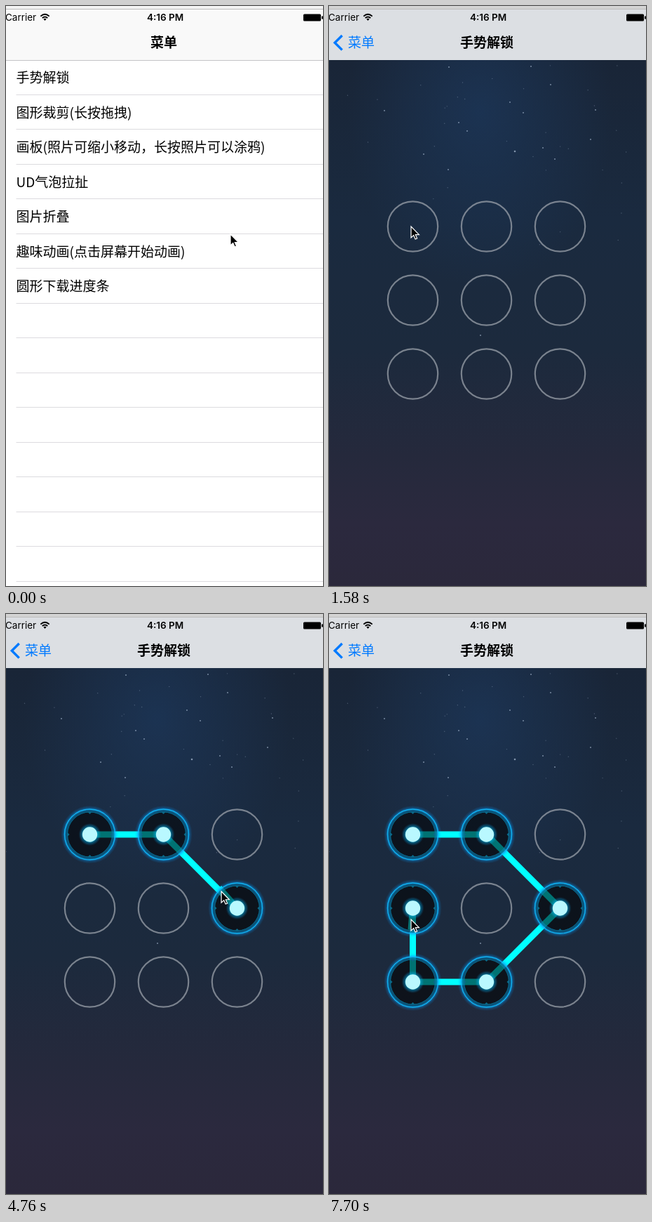
These frames come from a looping animation (452x826 px, 8 s). An HTML page:

```html
<!DOCTYPE html>
<html lang="zh">
<head>
<meta charset="utf-8">
<style>
  html, body { margin: 0; width: 100%; height: 100%; overflow: hidden; background: #fff; }
  svg { display: block; width: 100vw; height: 100vh; }
  text { font: 19px "Noto Sans CJK SC", "Noto Sans CJK", sans-serif; }
  .title { font-weight: 600; text-anchor: middle; }
  .status { font: 13.5px Inter, sans-serif; }
  .clock { font-weight: 600; text-anchor: middle; }
  .blue { fill: #007aff; }
</style>
</head>
<body>
<svg viewBox="0 0 452 826">
  <defs>
    <linearGradient id="sky" x2="0" y2="1">
      <stop offset="0" stop-color="#192537"/>
      <stop offset=".3" stop-color="#1a2a3f"/>
      <stop offset=".55" stop-color="#1c2a3d"/>
      <stop offset=".75" stop-color="#25293c"/>
      <stop offset=".88" stop-color="#2b293e"/>
      <stop offset="1" stop-color="#2b283b"/>
    </linearGradient>
    <radialGradient id="haze">
      <stop offset="0" stop-color="#1c3658" stop-opacity=".8"/>
      <stop offset="1" stop-color="#1c3658" stop-opacity="0"/>
    </radialGradient>
    <linearGradient id="shade">
      <stop offset="0" stop-opacity="0"/>
      <stop offset="1" stop-opacity=".14"/>
    </linearGradient>
    <linearGradient id="tint">
      <stop offset="0" stop-color="#c9cdd7" stop-opacity="0"/>
      <stop offset=".11" stop-color="#c9cdd7"/>
    </linearGradient>
    <radialGradient id="glow">
      <stop offset=".5" stop-color="#00d5ff" stop-opacity=".75"/>
      <stop offset="1" stop-color="#00a5ff" stop-opacity="0"/>
    </radialGradient>
  </defs>

  <rect width="452" height="826" fill="#fff"/>
  <g id="menu">
    <rect id="pressed" x="-8" y="77" width="600" height="49" fill="#d9d9d9"/>
  </g>
  <rect id="dim" y="77" width="452" height="749"/>

  <g id="page">
    <rect x="-20" y="77" width="12" height="749" fill="url(#shade)"/>
    <rect x="-8" y="77" width="468" height="749" fill="url(#sky)"/>
    <ellipse cx="215" cy="150" rx="190" ry="250" fill="url(#haze)" clip-path="inset(0)"/>
    <g id="stars" fill="#b9cbe0"></g>
    <polyline id="trail" fill="none" stroke="#00ffff" stroke-width="9" stroke-linejoin="round"/>
    <g id="nodes"></g>
  </g>

  <rect width="452" height="77" fill="#f9f9f9"/>
  <rect id="bar" width="640" height="77" fill="url(#tint)"/>
  <rect id="barEnd" width="452" height="77" fill="#dcdfe3"/>
  <rect id="hairline" y="77" width="452" height="1" fill="#c4c4c6"/>
  <rect id="strip" width="452" height="4.5"/>
  <rect y="4" width="452" height="1" fill="#bdbdbd"/>

  <text class="status" x="-1" y="21">Carrier</text>
  <text class="status clock" x="227" y="21">4:16 PM</text>
  <g fill="none" stroke="#000" stroke-width="1.9">
    <path d="M49.3 14.6Q55.5 9 61.7 14.6M51.7 17.1Q55.5 13.7 59.3 17.1"/>
    <path d="M53.4 18.6Q55.5 17 57.6 18.6L55.5 21Z" fill="#000" stroke="none"/>
  </g>
  <rect x="424" y="11.5" width="25" height="10" rx="1.5"/>
  <rect x="450" y="14.5" width="2" height="4"/>

  <text id="menuTitle" class="title" x="225" y="59">菜单</text>
  <text id="pageTitle" class="title" x="225" y="59">手势解锁</text>
  <path id="chevron" d="M18.7 42L8.3 52.3L18.7 62.6" fill="none" stroke="#007aff" stroke-width="3.4"/>
  <text id="back" class="blue" x="27" y="59">菜单</text>
  <path id="cursor" d="M0 0V16L3.7 12.6L6.1 18L8.6 17L6.3 11.7H11.4Z" stroke="#fff" stroke-width="1.2"/>
</svg>

<script>
const LOOP = 8000;
const SCREEN = 466;
const $ = id => document.getElementById(id);

function add(parent, tag, attrs, text = '') {
  const el = document.createElementNS('http://www.w3.org/2000/svg', tag);
  for (const key in attrs) el.setAttribute(key, attrs[key]);
  el.textContent = text;
  return parent.appendChild(el);
}

// Menu rows
const rows = ['手势解锁', '图形裁剪(长按拖拽)', '画板(照片可缩小移动，长按照片可以涂鸦)',
  'UD气泡拉扯', '图片折叠', '趣味动画(点击屏幕开始动画)', '圆形下载进度条'];
for (let i = 0; i < 15; i++) {
  const y = 126 + i * 49.5;
  add($('menu'), 'rect', { x: 14.5, y: Math.floor(y), width: 600, height: 1, fill: '#dcdbdf' });
  if (rows[i]) add($('menu'), 'text', { x: 14.5, y: y - 17 }, rows[i]);
}

// Night sky
const stars = [[171, 87], [258, 137], [316, 112], [380, 148], [265, 207], [185, 166], [277, 152],
  [170, 233], [322, 218], [373, 190], [135, 211], [79, 149], [288, 86], [197, 178], [305, 202], [216, 469]];
stars.forEach(([cx, cy], i) => add($('stars'), 'circle', { cx, cy, r: i === 4 ? 1.3 : 0.9, opacity: 0.65 }));
let seed = 7;
const random = () => (seed = seed * 16807 % 2147483647) / 2147483647;
for (let i = 0; i < 34; i++) {
  add($('stars'), 'circle', { cx: random() * 452, cy: 80 + random() ** 1.4 * 290, r: 0.7, opacity: 0.3 });
}

// Lock buttons
const spot = i => [119.5 + i % 3 * 105, 314 + Math.floor(i / 3) * 105];
const nodes = Array.from({ length: 9 }, (_, i) => {
  const g = add($('nodes'), 'g', { transform: `translate(${spot(i)})` });
  const off = add(g, 'circle', { r: 35.7, fill: 'none', stroke: '#9aa0aa', 'stroke-width': 2.2, opacity: 0.75 });
  const on = add(g, 'g', {});
  const ring = (r, stroke, width, opacity) =>
    add(on, 'circle', { r, fill: 'none', stroke, 'stroke-width': width, opacity });
  add(on, 'circle', { r: 35, fill: '#000', opacity: 0.55 });
  ring(36, '#009dff', 9, 0.12);
  ring(36, '#009dff', 5, 0.25);
  ring(33.5, '#0a82b4', 4, 0.4);
  ring(36, '#10b4f5', 1.4, 1);
  ring(32, '#0a86ac', 0.8, 0.7);
  for (const turn of [0, 90, 180, 270]) {
    add(on, 'path', { d: 'M-3 -32H3L0 -29Z', fill: '#0a6a8a', transform: `rotate(${turn})` });
  }
  add(on, 'circle', { r: 16, fill: 'url(#glow)' });
  add(on, 'circle', { r: 10.7, fill: '#b9f8ff' });
  return { off, on };
});

// [button, time it lights up]
const links = [[0, 1780], [1, 2800], [5, 4620], [7, 5830], [6, 6920], [3, 7630]];

// [time, x, y] of the pointer
const path = [[0, 320, 325], [60, 320, 325], [800, 137, 104], [1060, 137, 104], [1560, 117, 314],
  [1780, 117, 314], [2320, 162, 320], [2540, 162, 320], [3310, 250, 318], [3490, 264, 320],
  [4170, 277, 348], [4760, 307, 395], [4980, 312, 409], [5780, 256, 479], [5840, 249, 487],
  [6650, 182, 514], [7150, 126, 520], [7470, 117, 496], [7690, 117, 435], [LOOP, 117, 435]];

function pointer(t) {
  const i = Math.max(1, path.findIndex(step => step[0] >= t));
  const [t0, x0, y0] = path[i - 1], [t1, x1, y1] = path[i];
  let k = (t - t0) / (t1 - t0);
  if (t < 1600) k = k * k * (3 - 2 * k);
  return [x0 + (x1 - x0) * k, y0 + (y1 - y0) * k];
}

// Critically damped push, settled after about 450 ms
function pushed(t) {
  const s = Math.max(0, t - 960) * 0.0205;
  const p = 1 - (1 + s) * Math.exp(-s);
  return p > 0.999 ? 1 : p;
}

const move = (id, x, y = 0) => $(id).setAttribute('transform', `translate(${x} ${y})`);
const fade = (id, value) => $(id).setAttribute('opacity', Math.min(1, Math.max(0, value)));
const show = (el, visible) => el.setAttribute('visibility', visible ? 'visible' : 'hidden');

function draw(t) {
  const p = pushed(t), rest = 1 - p;
  show($('pressed'), t >= 910);
  show($('page'), p > 0);
  move('menu', -0.3 * SCREEN * p);
  fade('dim', 0.1 * p);
  move('page', SCREEN * rest);

  move('bar', SCREEN * rest - 8 - 60 * p);
  fade('bar', p * 3);
  fade('barEnd', (p - 0.65) / 0.35);
  fade('hairline', 1 - 2 * p);
  $('strip').setAttribute('fill', t < 60 ? '#f3f3f3' : '#d3d3d3');

  move('menuTitle', -163 * p);
  fade('menuTitle', rest ** 1.5);
  move('pageTitle', 308 * rest);
  fade('pageTitle', p);
  move('back', 120 * rest);
  fade('back', (p - 0.65) / 0.35);
  fade('chevron', (p - 0.6) / 0.4);

  const lit = links.filter(([, start]) => t >= start).map(([i]) => i);
  nodes.forEach(({ off, on }, i) => {
    on.setAttribute('display', lit.includes(i) ? 'inline' : 'none');
    off.setAttribute('display', lit.includes(i) ? 'none' : 'inline');
  });
  // The line follows the pointer slightly late
  const points = lit.map(spot);
  if (lit.length) points.push(pointer(t - 65));
  $('trail').setAttribute('points', points.join(' '));
  move('cursor', ...pointer(t));
}

const began = performance.now();
function tick() {
  draw((performance.now() - began) % LOOP);
  requestAnimationFrame(tick);
}
tick();
</script>
</body>
</html>
```
